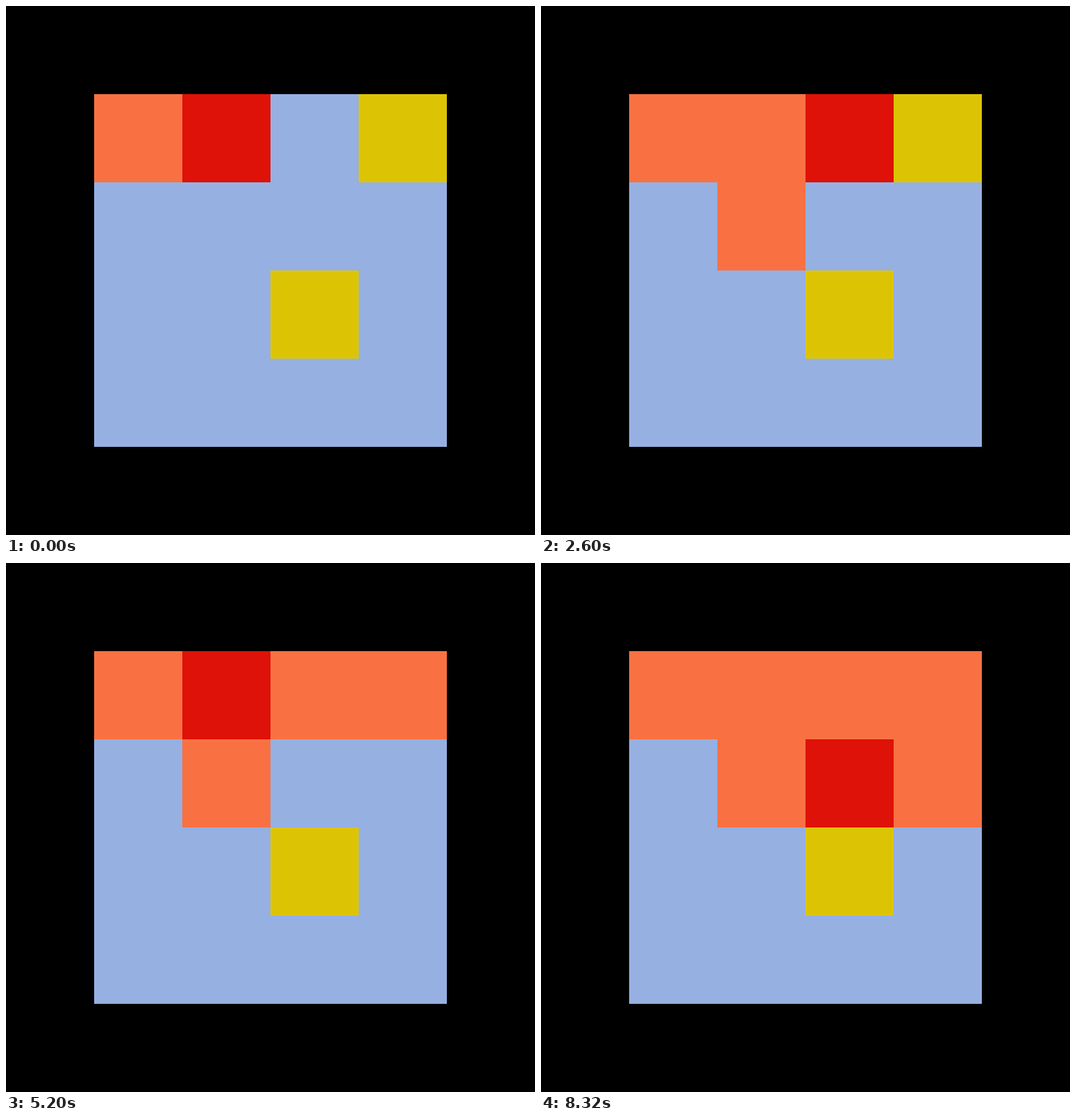
These frames come from a looping animation (600x600 px, 8.84 s). An HTML page with a canvas:

```html
<!DOCTYPE html>
<html lang="en">
<head>
<meta charset="utf-8">
<title>Grid walk</title>
<style>
  html, body { margin: 0; width: 100%; height: 100%; overflow: hidden; background: #000; }
  canvas { display: block; width: 600px; height: 600px; }
</style>
</head>
<body>
<canvas id="stage" width="600" height="600"></canvas>
<script>
const ctx = document.getElementById('stage').getContext('2d');
const SIZE = 4, CELL = 100, TICK = 520;
const COLORS = { floor: '#96b0e1', trail: '#f97142', walker: '#de1208', goal: '#dcc404' };
const STEPS = { R: { x: 1, y: 0 }, L: { x: -1, y: 0 }, D: { x: 0, y: 1 }, '.': { x: 0, y: 0 }, U: { x: 0, y: -1 } };
const GOALS = [{ x: 3, y: 0 }, { x: 2, y: 2 }];

// One step per tick; a dot means the walker stays put.
const ROUTE = 'R..DUR.R.LL..RRDL';

const path = [{ x: 0, y: 0 }];
for (const letter of ROUTE) {
  const from = path[path.length - 1], step = STEPS[letter];
  path.push({ x: from.x + step.x, y: from.y + step.y });
}

function fillCell({ x, y }, color, span = 1) {
  ctx.fillStyle = color;
  ctx.fillRect((x + 1) * CELL, (y + 1) * CELL, span * CELL, span * CELL);
}

function draw(time) {
  const position = Math.floor(time / TICK) % ROUTE.length + 1;
  fillCell({ x: 0, y: 0 }, COLORS.floor, SIZE);
  GOALS.forEach(cell => fillCell(cell, COLORS.goal));
  path.slice(0, position).forEach(cell => fillCell(cell, COLORS.trail));
  fillCell(path[position], COLORS.walker);
}

const began = performance.now();
function frame() {
  draw(performance.now() - began);
  requestAnimationFrame(frame);
}
frame();
</script>
</body>
</html>
```
